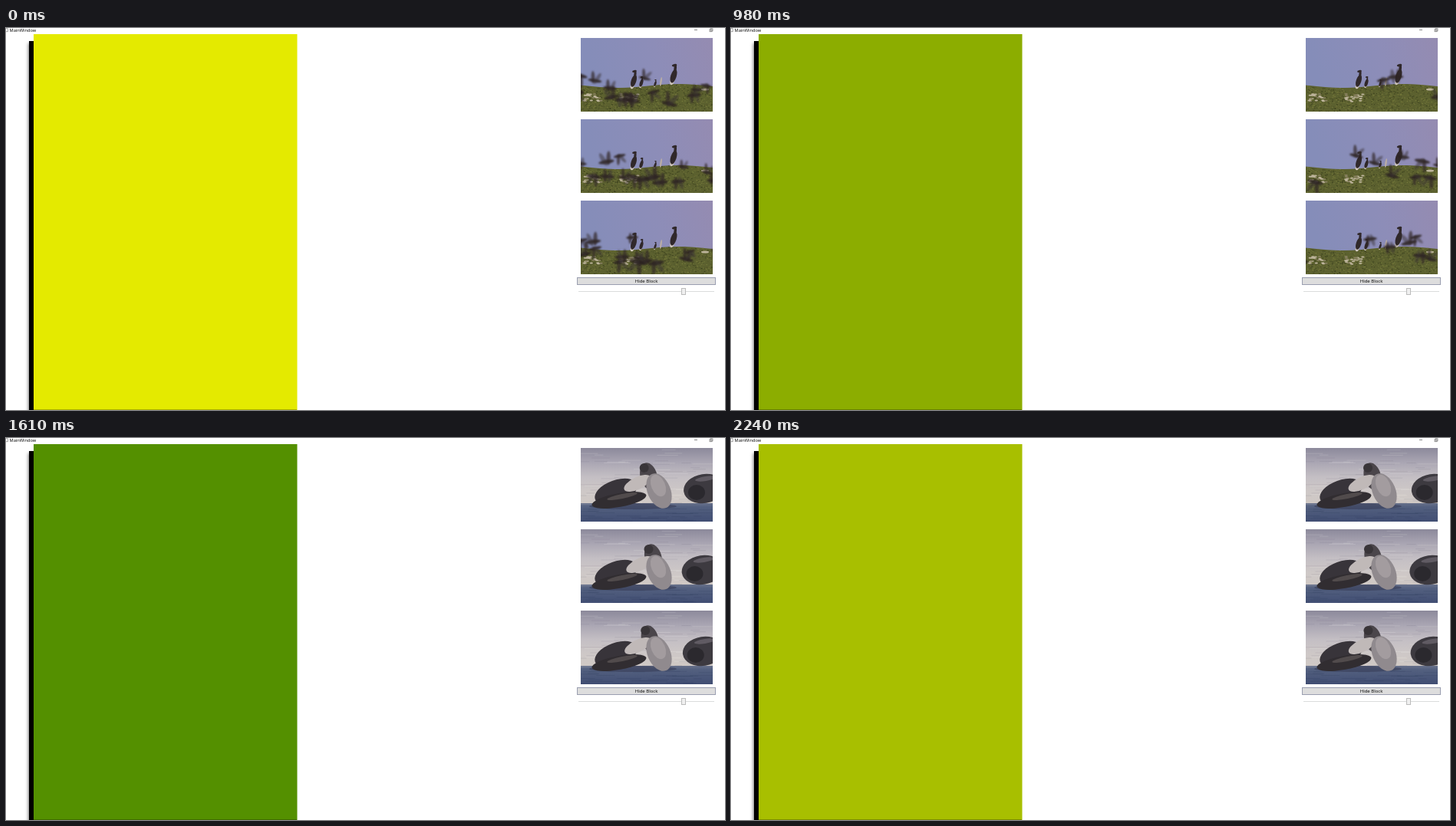
An HTML page with a canvas for the animation above (2.31 s loop, 937x498 px).

```html
<!DOCTYPE html>
<html>
<head>
<meta charset="utf-8">
<style>
  html, body { margin: 0; width: 100%; height: 100%; overflow: hidden; background: #fff; }
  canvas { display: block; }
</style>
</head>
<body>
<canvas id="stage" width="937" height="498"></canvas>
<script>
const ctx = document.getElementById('stage').getContext('2d');
const LOOP = 2310, STEP = 70, TURN = 1436, W = 172, H = 96;
const heldSteps = [4, 6, 19, 27, 29];
const clips = [{ y: 13, cut: 1190 }, { y: 119, cut: 1610 }, { y: 225, cut: 1400 }];

function seeded(seed) {
  return () => {
    seed = seed + 0x6D2B79F5 | 0;
    let v = Math.imul(seed ^ seed >>> 15, 1 | seed);
    v = v + Math.imul(v ^ v >>> 7, 61 | v) ^ v;
    return ((v ^ v >>> 14) >>> 0) / 4294967296;
  };
}

function rect(x, y, w, h, fill, stroke) {
  ctx.fillStyle = fill;
  ctx.fillRect(x, y, w, h);
  if (stroke) {
    ctx.strokeStyle = stroke;
    ctx.lineWidth = 1;
    ctx.strokeRect(x + .5, y + .5, w - 1, h - 1);
  }
}

function oval(x, y, rx, ry, tilt, fill) {
  ctx.beginPath();
  ctx.ellipse(x, y, rx, ry, tilt, 0, 7);
  ctx.fillStyle = fill;
  ctx.fill();
}

function text(str, x, y, size, align) {
  ctx.font = size + 'px "Open Sans", "Noto Sans", sans-serif';
  ctx.textAlign = align;
  ctx.fillStyle = '#000';
  ctx.fillText(str, x, y);
}

// Evenly spaced colour stops from the corner to (x, y)
function gradient(x, y, ...colors) {
  const g = ctx.createLinearGradient(0, 0, x, y);
  colors.forEach((color, i) => g.addColorStop(i / (colors.length - 1), color));
  return g;
}

const hill = x => 62.5 + 2.5 * Math.cos((x - 48) / 25);

function grass() {
  const rand = seeded(5);
  const shades = ['#3e431f', '#757a3c', '#50552a', '#6a6a35'];
  for (let x = 0; x < W; x++) rect(x, hill(x), 1, H, '#5c612f');
  for (let i = 0; i < 1100; i++) {
    const x = rand() * W, top = hill(x);
    rect(x, top + rand() * (H - top), 1 + rand(), 1, shades[i % 4]);
  }
  for (let i = 0; i < 45; i++) {
    const x = (i % 2 ? 16 : 64) + (rand() - .5) * 24;
    oval(x, 78 + (rand() - .5) * 10, 2.2, 1, 0, i % 3 ? '#bdb49b' : '#87805f');
  }
  oval(162, 67, 5, 1.5, 0, '#bdb49b');
}

function standingBird(x, foot, h) {
  const dark = '#30282a';
  oval(x - h * .06, foot - h * .2, h * .1, h * .22, .3, '#d0c7bd');
  oval(x, foot - h * .42, h * .14, h * .34, .3, dark);
  oval(x + h * .08, foot - h * .78, h * .065, h * .2, .1, dark);
  oval(x + h * .04, foot - h * .94, h * .12, h * .06, -.2, dark);
}

function flyingBird(x, y, size, dir, flap) {
  ctx.save();
  ctx.translate(x, y);
  ctx.scale(dir * size, size);
  ctx.rotate(flap * .25);
  oval(0, 0, 9, 2.2, 0, 'rgba(42,33,32,.85)');
  oval(-3, -6 * flap, 2.3, 8, -.3 * flap, 'rgba(48,39,39,.7)');
  oval(3, -5 * flap, 2.5, 8, .6 * flap, 'rgba(56,47,49,.5)');
  ctx.restore();
}

function flock(time) {
  const rand = seeded(31);
  const count = Math.min(16, 1.5 - time / 85);
  for (let i = 0; i < 16; i++) {
    const start = rand() * 200, dir = rand() < .5 ? -1 : 1, speed = .04 + rand() * .06;
    const height = 50 + rand() * 34, size = .8 + rand() * .5, phase = rand() * 6;
    if (i >= count) continue;
    const x = ((start + dir * speed * time) % 200 + 200) % 200 - 15;
    const y = height + 4 * Math.sin(time / 170 + phase);
    flyingBird(x, y, size, dir, Math.sin(time / 48 + phase));
  }
}

function meadow(time) {
  rect(0, 0, W, H, gradient(W, -50, '#858db9', '#8d8db8', '#968bb0'));
  grass();
  ctx.filter = 'blur(0.4px)';
  [[69, 66, 24], [79, 65, 15], [97, 64, 10], [121, 61, 27]].forEach(b => standingBird(...b));
  oval(104.5, 57, 1.2, 6, .15, '#b9ada6');
  ctx.filter = 'blur(0.9px)';
  flock(time);
  ctx.filter = 'none';
}

function sand() {
  rect(0, 0, W, 76, gradient(0, 76, '#8c899b', '#aaa6b3', '#c4bfc4', '#cec8c7', '#d0c9c4'));
  rect(0, 72, W, 24, gradient(0, H, '#bbb6b8', '#bbb6b8', '#bbb6b8', '#a5a3ac', '#53607f', '#414e73'));
  const rand = seeded(9);
  for (let i = 0; i < 100; i++) {
    const y = rand() * H;
    const tint = y > 76 ? '30,40,75' : i % 2 ? '255,250,245' : '100,95,115';
    rect(rand() * W - 15, y, 8 + rand() * 30, .9, `rgba(${tint},.15)`);
  }
}

function beach(time) {
  const lean = 5.5 * Math.exp(-time / 170) - time / 520;
  const drift = time / 170 - 3.5;
  sand();
  ctx.filter = 'blur(0.5px)';
  oval(68, 76, 57, 4, 0, 'rgba(55,60,88,.6)');
  oval(46, 57, 29, 15, -.35, '#38343a');
  oval(89 + lean, 37, 11, 18, -.25, '#4b464b');
  oval(83 + lean, 26, 6, 6, 0, '#393539');
  oval(74 + lean / 2, 46, 19, 8, -.45, '#c0b9b8');
  oval(102, 56, 15, 24, -.4, '#908a8e');
  oval(101, 49, 9, 15, -.4, '#a39c9f');
  oval(50, 68, 36, 9, -.18, '#312d31');
  oval(54, 63, 20, 3, -.2, '#514b4c');
  oval(162 + drift, 53, 27, 19, -.15, '#3d3a40');
  oval(152 + drift, 58, 11, 10, 0, '#2b292e');
  oval(164 + drift, 40, 14, 3, -.15, '#605b63');
  ctx.filter = 'none';
}

function drawClip({ y, cut }, time) {
  ctx.save();
  ctx.beginPath();
  ctx.rect(749, y, W, H);
  ctx.clip();
  ctx.translate(749, y);
  time < cut ? meadow(time - cut) : beach(time - cut);
  ctx.restore();
}

// Yellow to green and back, mixed in linear light
function blockColor(time) {
  const k = time < TURN ? .785 * (1 - (time / TURN) ** 1.09) : (time - TURN) * .000494;
  const channel = v => Math.round(255 * v ** (1 / 2.2));
  return `rgb(${channel(k)},${channel(.2158 + .7842 * k)},0)`;
}

function drawWindow() {
  rect(0, 0, 937, 498, '#fff');
  ctx.strokeStyle = '#666';
  ctx.lineWidth = .6;
  ctx.strokeRect(-.5, .8, 3, 4);
  text('MainWindow', 4.5, 5, 5.7, 'left');
  rect(897, 2, 4, 1, '#888');
  ctx.strokeRect(917, 1.8, 3, 3);
  ctx.strokeRect(918, .9, 3, 3);
  rect(744, 325, 181, 10, '#dddddd', '#9a9eb0');
  text('Hide Block', 834.5, 332.2, 6, 'center');
  rect(746, 343, 177, 1, '#dadcdc');
  rect(880, 339, 6, 9, '#f0f0f0', '#bcbcbc');
}

function drawBlock(time) {
  ctx.save();
  ctx.shadowColor = 'rgba(0,0,0,.5)';
  ctx.shadowBlur = 4;
  ctx.shadowOffsetX = -1;
  ctx.shadowOffsetY = 3;
  rect(30, 17, 300, 500, '#000');
  ctx.restore();
  rect(36, 8, 343.5, 490, blockColor(time));
  rect(36, 497, 343, 1, 'rgba(0,0,0,.25)');
}

function draw(now) {
  let step = Math.floor(now % LOOP / STEP);
  if (heldSteps.includes(step)) step--;
  const time = step * STEP;
  drawWindow();
  drawBlock(time);
  clips.forEach(clip => drawClip(clip, time));
  requestAnimationFrame(draw);
}

draw(0);
</script>
</body>
</html>
```
